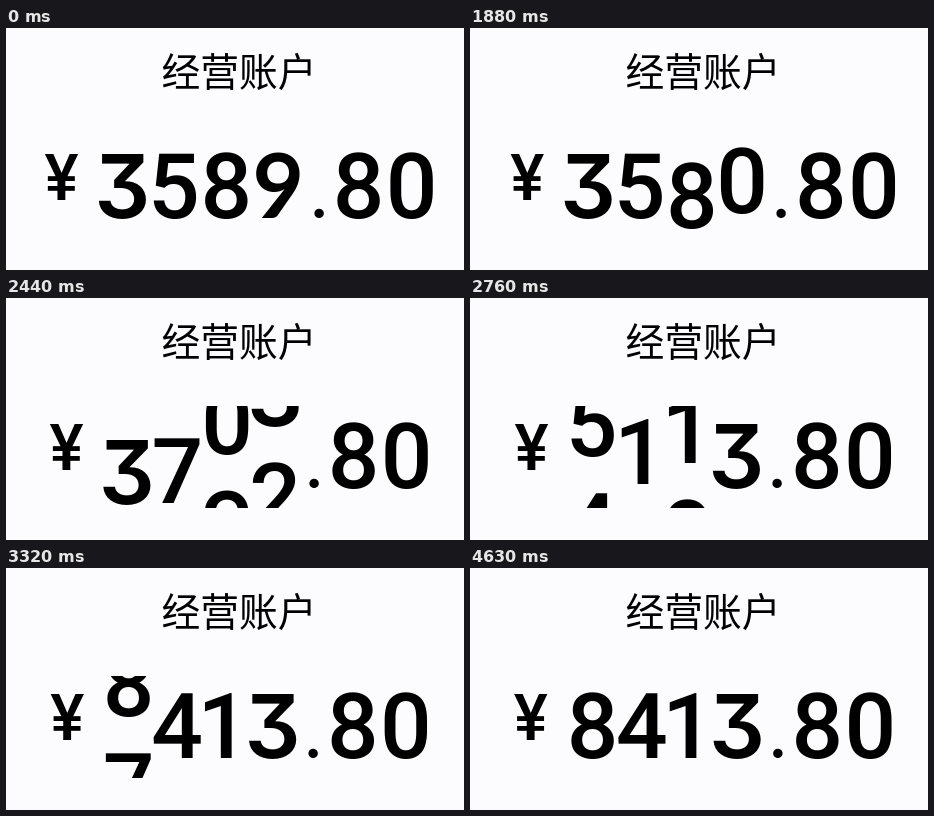
An HTML page that plays this animation: 458 by 242 pixels, repeating every 4890 ms.

```html
<!DOCTYPE html>
<html lang="zh-CN">
<head>
<meta charset="utf-8">
<style>
html, body { margin: 0; width: 100%; height: 100%; overflow: hidden; background: #fcfcfe; }
svg { display: block; width: 458px; height: 242px; }
text { text-anchor: middle; fill: #000; }
.title { font: 350 38.8px "Noto Sans CJK SC", "Noto Sans CJK", sans-serif; }
.yen { font: 500 64px Roboto, sans-serif; }
.digit { font: 500 91px Roboto, sans-serif; }
.three { font: 600 88px Inter, sans-serif; font-feature-settings: "cv09"; }
.nine { font: 700 89px Lato, sans-serif; }
.dot { font: 700 62px Lato, sans-serif; }
</style>
</head>
<body>
<svg viewBox="0 0 458 242">
  <clipPath id="window"><rect y="108" width="458" height="102"/></clipPath>
  <text class="title" x="233" y="58">经营账户</text>
  <g id="left"><text class="yen" x="55.5" y="172">¥</text></g>
  <g id="wheels" clip-path="url(#window)"></g>
  <g id="right">
    <text class="dot" x="313" y="190">.</text>
    <text class="digit" x="352.7" y="190">8</text>
    <text class="digit" x="405.7" y="190">0</text>
  </g>
</svg>
<script>
const LOOP = 4890, PITCH = 102, BASE = 190, LEFT = 90.75, FULL = 207;
const WIDTHS = [47.5, 47, 45, 51, 45.5, 52, 50, 50.5, 53, 51];
const $ = id => document.getElementById(id);

const addText = () => $('wheels').appendChild(
  document.createElementNS('http://www.w3.org/2000/svg', 'text'));

// Thousands to ones; the rightmost wheel starts first.
const wheels = [[3, 5], [5, 9], [8, 3], [9, 4]].map(([from, turns], i) =>
  ({ from, turns, start: 48 - 6 * i, now: addText(), next: addText() }));

// Uneven frame rhythm: 20, 20, 100 ms.
function tick(t) {
  const beat = Math.floor((t - 60) / 140), rest = t - 60 - beat * 140;
  return beat * 3 + (rest < 20 ? 0 : rest < 40 ? 1 : 2);
}

function ease(n) {
  const x = Math.min(1, Math.max(0, (n + 0.25) / 28.5));
  return (1 - Math.cos(Math.PI * x)) / 2;
}

function put(el, digit, x, y) {
  el.textContent = digit;
  el.setAttribute('class', digit === 3 ? 'three' : digit === 9 ? 'nine' : 'digit');
  el.setAttribute('x', x);
  el.setAttribute('y', y);
}

function draw(t) {
  const n = tick(t);
  const states = wheels.map(w => {
    const p = w.turns * ease(n - w.start), step = Math.floor(p), f = p - step;
    const a = (w.from + step) % 10, b = (a + 1) % 10;
    return { w, a, b, f, width: WIDTHS[a] + (WIDTHS[b] - WIDTHS[a]) * f };
  });
  const shift = (FULL - states.reduce((sum, s) => sum + s.width, 0)) / 2;
  let x = LEFT + shift;
  for (const { w, a, b, f, width } of states) {
    const mid = x + width / 2;
    put(w.now, a, mid, BASE + f * PITCH);
    put(w.next, b, mid, BASE + (f - 1) * PITCH);
    x += width;
  }
  $('left').setAttribute('transform', `translate(${shift})`);
  $('right').setAttribute('transform', `translate(${-shift})`);
}

function frame() {
  draw(performance.now() % LOOP);
  requestAnimationFrame(frame);
}
frame();
</script>
</body>
</html>
```
